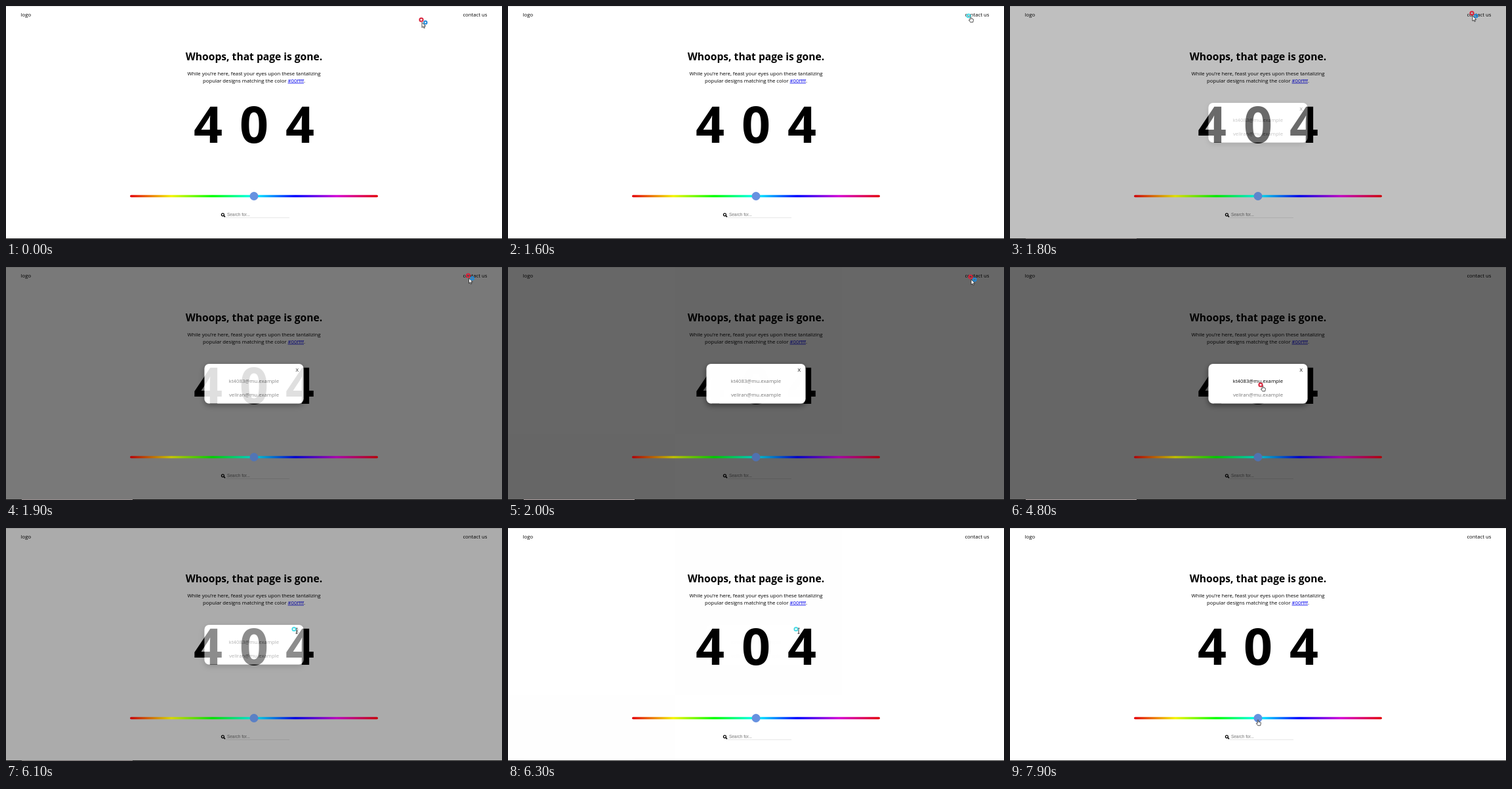
These frames come from a looping animation (756x356 px, 8 s). An HTML page:

```html
<!DOCTYPE html>
<html lang="en">
<head>
<meta charset="utf-8">
<title>Page not found</title>
<style>
  html, body { margin: 0; width: 100%; height: 100%; overflow: hidden; background: #fff; }
  svg { display: block; width: 756px; height: 356px; font: 7.75px "Open Sans", "Noto Sans", sans-serif; }
  .mid { text-anchor: middle; }
  .bold { font-weight: 700; }
  .pointer path { fill: #fff; stroke: #222; stroke-width: .8; stroke-linejoin: round; }
  .ring { fill: none; stroke-width: 2; }
</style>
</head>
<body>
<svg viewBox="0 0 756 356">
  <defs>
    <linearGradient id="hues">
      <stop offset="0" stop-color="#e3000b"/>
      <stop offset=".1667" stop-color="#f4f400"/>
      <stop offset=".3333" stop-color="#0f0"/>
      <stop offset=".5" stop-color="#0ff"/>
      <stop offset=".6667" stop-color="#00f"/>
      <stop offset=".8333" stop-color="#d400d4"/>
      <stop offset="1" stop-color="#e3000b"/>
    </linearGradient>
    <filter id="shadow" x="-20%" y="-30%" width="140%" height="180%">
      <feDropShadow dx="0" dy="3" stdDeviation="4" flood-opacity=".5"/>
    </filter>
  </defs>

  <path d="M0 .5H756" stroke="#e4e4e4"/>
  <path d="M0 355.5H756" stroke="#2d2d2d"/>
  <text x="22.5" y="16.3">logo</text>
  <text x="733.5" y="16.3" text-anchor="end">contact us</text>
  <text class="mid bold" x="378" y="83.2" font-size="15.6">Whoops, that page is gone.</text>
  <text class="mid" x="378" y="106.2">While you’re here, feast your eyes upon these tantalizing</text>
  <text class="mid" x="378" y="116.6">popular designs matching the color <tspan fill="#00e" text-decoration="underline">#00ffff</tspan>.</text>
  <g class="mid bold" font-size="77">
    <text x="308" y="209">4</text>
    <text x="378" y="209">0</text>
    <text x="448" y="209">4</text>
  </g>
  <g fill="none" stroke="#000">
    <circle cx="330.4" cy="318.8" r="2" stroke-width="1.2"/>
    <path d="M331.9 320.3L334 322.4" stroke-width="1.5"/>
    <path d="M335 323.5H432" stroke="#e2e2e2" stroke-width=".8"/>
  </g>
  <text x="337" y="321.3" font-size="6.45" fill="#757575" font-family="Liberation Sans, Arial, sans-serif">Search for...</text>

  <g id="modal">
    <path d="M0 0H756V356H0Z" fill-opacity=".6"/>
    <path d="M24 355.5H193" stroke="#a99c9c"/>
    <rect x="302.5" y="148" width="151" height="60.5" rx="7" fill="#fff" filter="url(#shadow)"/>
    <text class="mid" x="443.7" y="159.6">X</text>
    <text class="mid mail" x="378" y="176.6">kt4083@mu.example</text>
    <text class="mid mail" x="378" y="198.2">veliran@mu.example</text>
  </g>

  <g id="slider">
    <rect x="189" y="288.8" width="378" height="3.5" rx="1.75" fill="url(#hues)"/>
    <circle cx="378" cy="290.5" r="6.5" fill="#6691e0"/>
  </g>

  <g id="cursor">
    <g class="pointer" id="arrow">
      <path d="M0 0V8L1.9 6.3 3.1 9 4.4 8.4 3.2 5.8H5.7Z"/>
      <circle class="ring" cx="5.3" cy=".3" r="2.2" stroke="#1e88d8"/>
    </g>
    <g class="pointer" id="hand">
      <path d="M-.8 .6Q0 -.6 .8 .6V3.2L4 4Q4.6 4.3 4.4 5.2L3.7 8.8H-.2L-2.6 5.6Q-2.4 4.4 -.8 5.4Z"/>
    </g>
    <g id="beam"><path d="M-1.5 -3.8H1.5M0 -3.8V4.2M-1.5 4.2H1.5" fill="none" stroke="#222" stroke-width=".9"/></g>
    <circle class="ring" id="ring" r="2.6"/>
  </g>
</svg>
<script>
const $ = id => document.getElementById(id);
const mails = document.querySelectorAll('.mail');
const LOOP = 8000;

// pointer stops: time, x, y
const path = [
  [0, 634, 25], [400, 716, 15], [550, 716, 15], [1000, 706, 13], [1450, 706, 13],
  [1550, 705, 16], [1700, 705, 16], [1800, 705, 15], [2000, 706, 19], [2300, 284, 280],
  [2900, 382, 174], [3150, 382, 174], [3450, 302, 184], [3800, 382, 194], [4050, 382, 194],
  [4450, 380, 193], [4800, 385, 181], [5150, 385, 181], [5900, 443, 157],
  [6950, 443, 157], [7300, 378, 293], [8000, 378, 293]
];
const ringAt = { arrow: [-1, -4], hand: [-3, -1], beam: [-4, -2.5] };

const clamp = v => Math.min(1, Math.max(0, v));
const smooth = u => u * u * (3 - 2 * u);

// CSS "ease" timing curve
function ease(x) {
  let lo = 0, hi = 1;
  const curve = (s, a, b) => 3 * s * (1 - s) * ((1 - s) * a + s * b) + s ** 3;
  for (let i = 0; i < 20; i++) {
    const s = (lo + hi) / 2;
    curve(s, .25, .25) < x ? lo = s : hi = s;
  }
  return curve(lo, .1, 1);
}

function pointerAt(t) {
  const i = path.findIndex(p => p[0] > t);
  const [t0, x0, y0] = path[i - 1], [t1, x1, y1] = path[i];
  const u = smooth((t - t0) / (t1 - t0));
  return [x0 + (x1 - x0) * u, y0 + (y1 - y0) * u];
}

function draw(t) {
  const [x, y] = pointerAt(t);
  const inside = (l, top, r, b) => x > l && x < r && y > top && y < b;
  const fade = t => ease(clamp(t / 300));
  const shown = fade(t - 1725) * (1 - fade(t - 6020));
  const open = t > 1725 && t < 6020;

  $('modal').setAttribute('opacity', shown);
  $('slider').style.filter = `brightness(${1 - .22 * shown})`;

  const hovered = [inside(341, 166, 415, 184), inside(340, 188, 416, 205)].map(h => h && open);
  mails.forEach((m, i) => m.setAttribute('fill', hovered[i] ? '#000' : '#777'));

  const overLink = open
    ? hovered[0] || hovered[1] || inside(438, 152, 449, 163)
    : inside(696, 8, 734, 20) || inside(371, 284, 385, 298);
  const overDigits = !open && inside(288, 150, 468, 212);
  const kind = overLink ? 'hand' : overDigits ? 'beam' : 'arrow';
  for (const id in ringAt) $(id).style.display = id === kind ? '' : 'none';

  const clicked = t >= 1500 && t < 1700 || t >= 5000 && t < 5150 || t >= 6050 && t < 6700;
  const ring = $('ring');
  ring.setAttribute('transform', `translate(${ringAt[kind]})`);
  ring.setAttribute('stroke', clicked ? '#4fdce6' : '#d8243c');
  ring.style.display = t > 7400 ? 'none' : '';
  $('cursor').setAttribute('transform', `translate(${x} ${y})`);
}

const start = performance.now();
function tick() {
  draw((performance.now() - start) % LOOP);
  requestAnimationFrame(tick);
}
tick();
</script>
</body>
</html>
```
